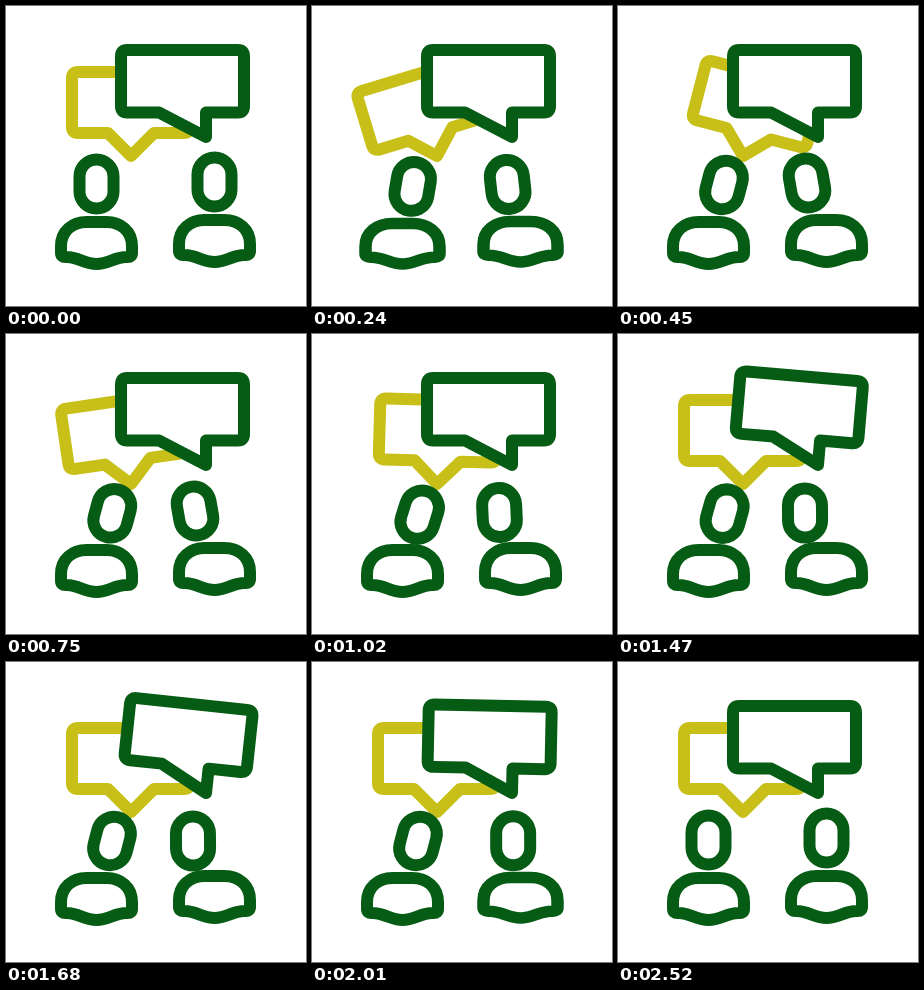
Recreate the animation shown at these times as an HTML page. Size 300 px wide and 300 px high, loop 2.55 s.

```html
<!DOCTYPE html>
<html lang="en">
<head>
<meta charset="utf-8">
<title>Conversation</title>
<style>
  html, body { margin: 0; width: 100%; height: 100%; overflow: hidden; background: #fff; }
  svg { display: block; width: 100%; height: 100%; }
  .line { fill: none; stroke: #075c15; stroke-width: 12; stroke-linejoin: round; stroke-linecap: round; }
  #back { stroke: #c8c018; }
  #front { fill: #fff; }
</style>
</head>
<body>
<svg viewBox="0 0 300 300">
  <defs>
    <rect id="head" x="-17" y="-24.500" width="34" height="49" rx="17"/>
    <path id="body" d="M-35.5 -18C-35.5 -33 -24 -42 -10 -42H10C24 -42 35.5 -33 35.5 -18V-11Q35.5 -7 31 -7C20 -8 12 0 0 0C-12 0 -20 -8 -31 -7Q-35.5 -7 -35.5 -11Z"/>
  </defs>
  <path id="back" class="line" d="M72 66H178Q184 66 184 72V121Q184 127 178 127H148L125 150L102 127H72Q66 127 66 121V72Q66 66 72 66Z"/>
  <use id="leftBody" class="line" href="#body"/>
  <use id="rightBody" class="line" href="#body"/>
  <use id="leftHead" class="line" href="#head"/>
  <use id="rightHead" class="line" href="#head"/>
  <path id="front" class="line" d="M121 44H232Q238 44 238 50V100.500Q238 106.500 232 106.500H200V131L153 106.500H121Q115 106.500 115 100.500V50Q115 44 121 44Z"/>
</svg>
<script>
const LOOP = 2550;
const FRONT_DELAY = 1118;
const SWING = [[0, 0], [175, -22], [446, 14.5], [730, -8.6], [950, 3], [1100, 0]]; // time, degrees

// Eased progress from 0 to 1 between two times.
function ramp(t, start, end) {
  const p = Math.min(1, Math.max(0, (t - start) / (end - start)));
  return (1 - Math.cos(Math.PI * p)) / 2;
}

const bump = p => Math.sin(Math.PI * p);

// Each eased step adds the difference to the previous angle.
function swing(t) {
  return SWING.slice(1).reduce((angle, [time, value], i) => {
    const [lastTime, lastValue] = SWING[i];
    return angle + (value - lastValue) * ramp(t, lastTime, time);
  }, 0);
}

function transform(id, value) {
  document.getElementById(id).setAttribute("transform", value);
}

// Lean towards the other person, nod, then return; the body dips with each move.
function drawPerson(side, x, y, t, { shift, tilt, nodTilt, nod, leave, back }) {
  const come = ramp(t, 0, 400);
  const go = ramp(t, leave, back);
  const lean = come - go;
  const dip = bump(come) + bump(go);
  const nodding = nod * lean;
  const headX = x + shift * lean + 2 * Math.sign(shift) * nodding;
  const headY = y - 80 + lean + 2 * nodding + 2 * dip;
  if (side === "right") transform("rightHead", "");
  transform(side + "Head", `translate(${headX} ${headY}) rotate(${tilt * lean + nodTilt * nodding})`);
  transform(side + "Body", `translate(${x} ${y}) scale(${1 + 0.048 * dip} ${1 - 0.04 * dip})`);
}

function draw() {
  const t = performance.now() % LOOP;
  transform("back", `rotate(${swing(t)} 125 150)`);
  transform("front", `rotate(${swing(t - FRONT_DELAY)} 200 131)`);
  drawPerson("left", 90.5, 258, t, {
    shift: 15.5, tilt: 14.5, nodTilt: 3.5, nod: bump(ramp(t, 600, 1700)), leave: 2150, back: 2490
  });
  drawPerson("right", 208.5, 256, t, {
    shift: -19.5, tilt: -10, nodTilt: 9.5, nod: ramp(t, 750, 1150), leave: 1800, back: 2150
  });
  requestAnimationFrame(draw);
}
draw();
</script>
</body>
</html>
```
